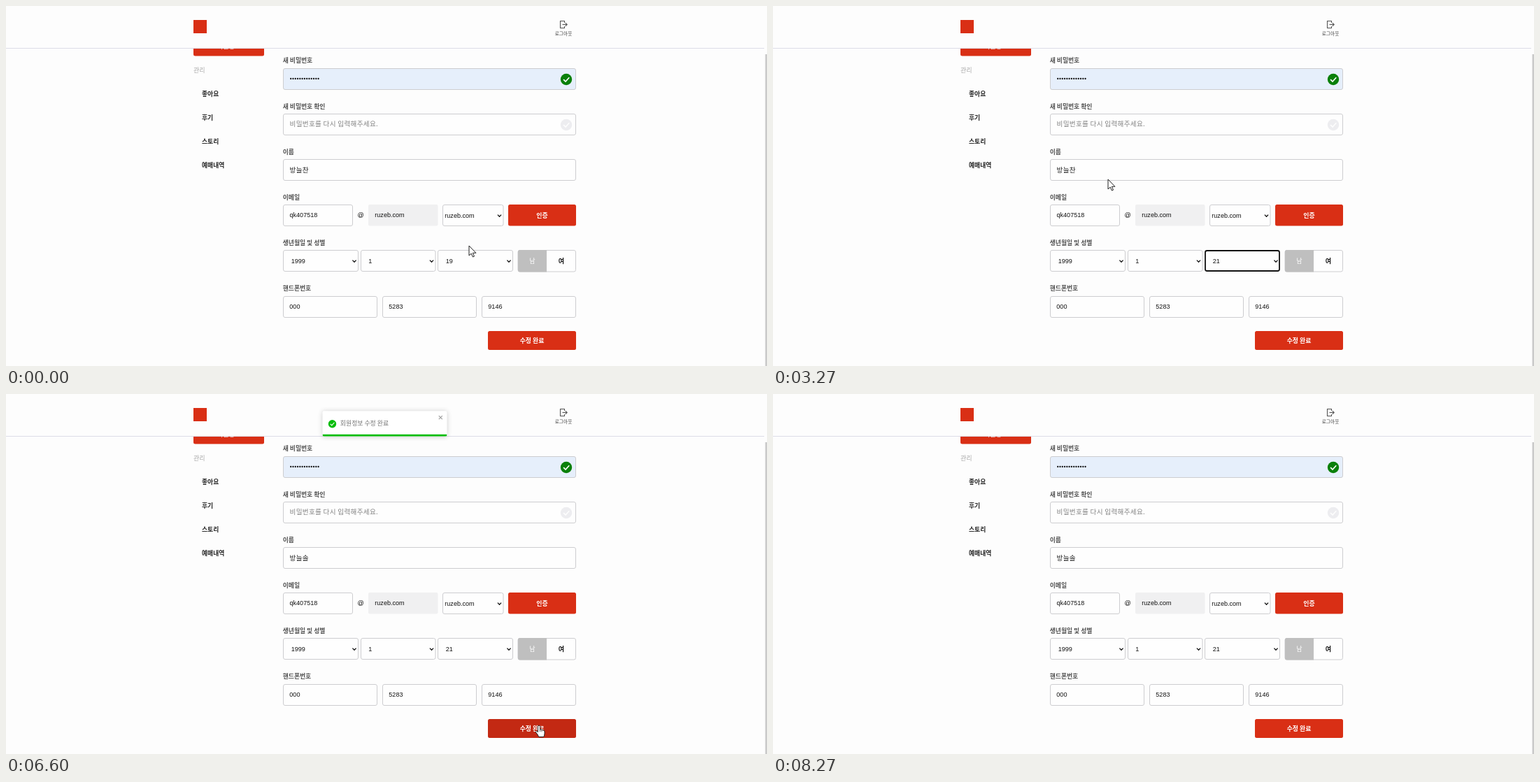
An HTML page with a canvas that plays this animation: 1088 by 515 pixels, repeating every 8.93 s.

```html
<!DOCTYPE html>
<html lang="ko">
<head>
<meta charset="utf-8">
<title>회원정보 수정</title>
<style>
  html, body { margin: 0; width: 100%; height: 100%; overflow: hidden; background: #fdfdfd; }
  canvas { display: block; }
</style>
</head>
<body>
<canvas id="stage" width="1088" height="515"></canvas>
<script>
const ctx = document.getElementById('stage').getContext('2d');
const LOOP = 8930;
const KO = '"Noto Sans CJK KR", "Noto Sans KR", "Noto Sans CJK", sans-serif';
const LATIN = '"Liberation Sans", Arial, sans-serif';
const RED = '#d92f15', RED_HOVER = '#c32913', BORDER = '#cdcdd0', GREEN = '#07bc0c';

const smooth = u => u * u * (3 - 2 * u);
const outCubic = u => 1 - (1 - u) ** 3;

// Interpolates rows of [time, ...values].
function track(keys, t, ease) {
  if (t <= keys[0][0]) return keys[0].slice(1);
  for (let i = 1; i < keys.length; i++) {
    const a = keys[i - 1], b = keys[i];
    if (t < b[0]) {
      const u = ease((t - a[0]) / (b[0] - a[0]));
      return a.slice(1).map((v, j) => v + (b[j + 1] - v) * u);
    }
  }
  return keys[keys.length - 1].slice(1);
}

// Last value of [time, value] already reached.
const step = (keys, t) => keys.reduce((v, k) => (t >= k[0] ? k[1] : v), null);

const pointer = [
  [30, 662, 343], [170, 632, 366], [300, 632, 366], [330, 630, 365],
  [630, 630, 365], [900, 641, 346], [1300, 651, 341],
  [1670, 651, 341], [1730, 652, 347], [1950, 652, 347], [2090, 630, 371],
  [2400, 718, 424], [2620, 718, 424], [2670, 717, 423],
  [2870, 717, 423], [3270, 479, 248], [3400, 479, 236], [3630, 490, 230],
  [5440, 490, 230], [5850, 768, 478], [6000, 762, 474],
  [7350, 762, 474], [7760, 846, -20]
];

const nameText = [
  [0, '방늘찬'], [3930, '방늘'], [4000, '방'], [4500, '방ㄴ'], [4630, '방느'],
  [4800, '방늘'], [4970, '방늘ㅅ'], [5030, '방늘소'], [5070, '방늘솔']
];

const toastIn = [[6190, -1700], [6610, 14.2], [6715, -5.7], [6820, 2.8], [6890, 0]];
const toastOut = [[7920, 0], [8060, -5.7], [8200, 11.3], [8235, 11.3], [8620, -1134]];

function text(s, x, cy, o = {}) {
  const { size = 9.07, color = '#111', weight = 400, align = 'left', font = KO, gap = 0 } = o;
  ctx.font = `${weight} ${size}px ${font}`;
  ctx.fillStyle = color;
  ctx.textAlign = align;
  ctx.letterSpacing = gap + 'px';
  ctx.fillText(s, x, cy + 3.3);
}

function box(x, y, w, h, fill, stroke, r = 2.5, line = 1) {
  ctx.beginPath();
  ctx.roundRect(x, y, w, h, r);
  if (fill) { ctx.fillStyle = fill; ctx.fill(); }
  if (stroke) { ctx.strokeStyle = stroke; ctx.lineWidth = line; ctx.stroke(); }
}

function line(points, color, width) {
  ctx.beginPath();
  points.forEach(([x, y], i) => (i ? ctx.lineTo(x, y) : ctx.moveTo(x, y)));
  ctx.strokeStyle = color;
  ctx.lineWidth = width;
  ctx.stroke();
}

function field(x, y, w, focus, fill = '#fefefe') {
  if (focus) box(x + 1, y + 1, w - 2, 29, fill, '#111', 2.5, 1.8);
  else box(x + .5, y + .5, w - 1, 30, fill, BORDER);
}

const plain = (s, x, cy) => text(s, x, cy, { font: LATIN });

function select(x, y, w, s, pad, focus) {
  field(x, y, w, focus);
  plain(s, x + pad, y + 15.5);
  const cx = x + w - 6, cy = y + 16;
  line([[cx - 2.6, cy - 1.4], [cx, cy + 1.3], [cx + 2.6, cy - 1.4]], '#111', 1.3);
}

function button(x, y, w, h, s, fill) {
  box(x, y, w, h, fill);
  text(s, x + w / 2, y + h / 2, { color: '#fff', weight: 600, align: 'center', size: 8.9 });
}

function check(x, y, r, fill, mark = '#fff') {
  ctx.beginPath();
  ctx.arc(x, y, r, 0, 7);
  ctx.fillStyle = fill;
  ctx.fill();
  line([[x - r * .48, y + r * .02], [x - r * .12, y + r * .38], [x + r * .52, y - r * .34]], mark, r * .19);
}

function drawHeader() {
  ctx.fillStyle = '#dcdce8';
  ctx.fillRect(0, 60, 1084, 1);
  ctx.fillStyle = '#c9c9c9';
  ctx.fillRect(1085.5, 69, 2.5, 446);
  ctx.fillStyle = RED;
  ctx.fillRect(268, 20, 19, 19);
  line([[798.5, 24], [798.5, 21.5], [792.5, 21.5], [792.5, 31.5], [798.5, 31.5], [798.5, 29]], '#555', 1.1);
  line([[795.5, 26.5], [802, 26.5]], '#555', 1.1);
  line([[799.8, 24.2], [802.2, 26.5], [799.8, 28.8]], '#555', 1.1);
  text('로그아웃', 797, 38.5, { size: 6.7, color: '#444', weight: 500, align: 'center' });
}

function drawSidebar() {
  ctx.save();
  ctx.beginPath();
  ctx.rect(268, 61, 102, 12);
  ctx.clip();
  box(268, 45, 101, 26.5, RED);
  text('회원정보', 318.5, 58, { color: '#fff', align: 'center' });
  ctx.restore();
  text('관리', 268, 91.5, { color: '#aaa' });
  ['좋아요', '후기', '스토리', '예매내역'].forEach((s, i) =>
    text(s, 280, 125.5 + i * 34.2, { weight: 600, size: 8.8, color: '#222' }));
}

function drawName(t, focus) {
  field(396, 219, 419, focus);
  const s = step(nameText, t);
  const style = { size: 9.6, gap: .3, color: '#222' };
  text(s, 405.5, 234.5, style);
  if (!focus) return;
  const end = 405.5 + ctx.measureText(s).width;
  ctx.fillStyle = '#111';
  if (t >= 4500 && t < 5250) ctx.fillRect(end - 9, 239.6, 8.6, .8);
  ctx.fillRect(end, 229, .9, 11.5);
}

function drawForm(t, hover) {
  ['새 비밀번호', '새 비밀번호 확인', '이름', '이메일', '생년월일 및 성별', '핸드폰번호'].forEach((s, i) =>
    text(s, 395.7, 78 + i * 65.2, { size: 8.8, weight: 600, color: '#505050' }));

  field(396, 89, 419, false, '#e6effb');
  ctx.fillStyle = '#111';
  for (let i = 0; i < 13; i++) {
    ctx.beginPath();
    ctx.arc(407.2 + i * 3.28, 104, 1.15, 0, 7);
    ctx.fill();
  }
  check(801, 105, 8.2, '#0a800a');

  field(396, 154, 419);
  text('비밀번호를 다시 입력해주세요.', 405.5, 168.5, { size: 9.6, gap: .3, color: '#808080' });
  check(801, 170, 8.2, '#ededf0', '#fdfdfd');

  drawName(t, t >= 3600 && t < 5970);

  field(396, 284, 100);
  plain('qk407518', 405.5, 298.5);
  text('@', 507, 299, { font: LATIN, align: 'center' });
  box(518, 284, 99.5, 30.5, '#f0f0f1', null, 2);
  plain('ruzeb.com', 527.3, 298.5);
  select(624, 284, 87.5, 'ruzeb.com', 3.3);
  button(718, 284, 97, 30.5, '인증', RED);

  select(396, 349, 108, '1999', 11.7);
  select(507, 349, 107.5, '1', 11.3);
  select(617, 349, 108, t < 1670 ? '19' : '21', 11.8, t >= 630 && t < 3600);
  box(732, 349.5, 82.5, 30.5, '#fefefe', BORDER);
  box(732, 349, 41, 31.5, '#bfbfbf', null, [2.5, 0, 0, 2.5]);
  text('남', 752.5, 364.5, { color: '#fff', align: 'center', weight: 500 });
  text('여', 794, 364.5, { align: 'center', weight: 600 });

  ['000', '5283', '9146'].forEach((s, i) => {
    field(396 + i * 142, 415, 135);
    plain(s, 405.3 + i * 142, 430);
  });
  button(689, 465, 126, 27, '수정 완료', hover ? RED_HOVER : RED);
}

function drawDayList(t, y) {
  const top = 120, row = 11.45, x = 617.5, w = 107.5;
  const scroll = smooth(Math.min(1, Math.max(0, (t - 1000) / 150)));
  const active = y < 349 ? Math.floor((y - top) / row + scroll) + 1 : 19;
  ctx.save();
  ctx.shadowColor = 'rgba(0,0,0,.26)';
  ctx.shadowBlur = 26;
  ctx.shadowOffsetY = 12;
  box(x, top, w, 229, '#fff', null, 0);
  ctx.restore();
  ctx.save();
  ctx.beginPath();
  ctx.rect(x, top, w, 229);
  ctx.clip();
  for (let d = 1; d <= 22; d++) {
    const ry = top + (d - 1 - scroll) * row;
    if (d === active) { ctx.fillStyle = '#1967d2'; ctx.fillRect(x, ry, w, row); }
    text(String(d), 629, ry + row / 2, { font: LATIN, color: d === active ? '#fff' : '#111' });
  }
  ctx.fillStyle = '#f1f1f1';
  ctx.fillRect(x + w - 9, top, 9, 229);
  ctx.fillStyle = '#c1c1c1';
  ctx.fillRect(x + w - 8, top + 9 + scroll * 7, 7, 136);
  ctx.restore();
  box(x, top, w, 229, null, '#777', 0, .7);
}

function drawToast(t) {
  if (t < 6190 || t > 8400) return;
  const [dy] = t < 7920 ? track(toastIn, t, outCubic) : track(toastOut, t, smooth);
  if (dy < -56 || t > 8260) return;
  ctx.save();
  ctx.translate(452.5, 10 + dy);
  ctx.save();
  ctx.shadowColor = 'rgba(0,0,0,.2)';
  ctx.shadowBlur = 7;
  ctx.shadowOffsetY = .6;
  box(0, 0, 178, 36.5, '#fff', null, 2.3);
  ctx.restore();
  check(14, 18.5, 5.7, GREEN);
  text('회원정보 수정 완료', 25.3, 18, { size: 8.9, color: '#757575' });
  line([[166.3, 7], [171.3, 12]], '#999', 1.1);
  line([[171.3, 7], [166.3, 12]], '#999', 1.1);
  const left = 1 - Math.min(1, Math.max(0, (t - 6900) / 1000));
  ctx.beginPath();
  ctx.roundRect(0, 0, 178, 36.5, 2.3);
  ctx.clip();
  ctx.fillStyle = GREEN;
  ctx.fillRect(0, 33.6, 178 * left, 2.9);
  ctx.restore();
}

const ARROW = new Path2D('M0 0V14L3.2 11.1 5.4 16 7.5 15.1 5.3 10.3H9.9Z');
const HAND = new Path2D('M-1.5 1.2Q0-1.4 1.5 1.2V6Q3.2 4.9 4 6.6Q5.6 5.8 6.2 7.4Q8 7 8 9V12' +
  'Q7.8 14 6.8 16.5H-.3Q-1.6 13-4.6 9.8Q-4.4 7.2-1.5 9.6Z');

function drawPointer(x, y, kind) {
  ctx.save();
  ctx.translate(x, y);
  if (kind === 'text') {
    line([[0, -6.5], [0, 6.5]], '#111', 1.5);
    line([[-4, -6.7], [4, -6.7]], '#111', 1.2);
    line([[-4, 6.7], [4, 6.7]], '#111', 1.2);
  } else {
    const shape = kind === 'hand' ? HAND : ARROW;
    ctx.fillStyle = '#fff';
    ctx.strokeStyle = '#222';
    ctx.lineWidth = 1;
    ctx.lineJoin = 'round';
    ctx.fill(shape);
    ctx.stroke(shape);
    if (kind === 'hand') {
      line([[1.5, 6], [1.5, 9]], '#222', .8);
      line([[4, 6.8], [4, 9.4]], '#222', .8);
    }
  }
  ctx.restore();
}

function draw(t) {
  const [x, y] = track(pointer, t, smooth);
  const hover = x > 689 && x < 815 && y > 465;
  const inName = x > 396 && x < 815 && y > 219 && y < 247 && t < 7000;
  ctx.fillStyle = '#fdfdfd';
  ctx.fillRect(0, 0, 1088, 515);
  drawHeader();
  drawSidebar();
  drawForm(t, hover);
  if (t >= 630 && t < 1670) drawDayList(t, y);
  drawToast(t);
  drawPointer(x, y, hover ? 'hand' : inName ? 'text' : 'arrow');
}

function frame() {
  draw(performance.now() % LOOP);
  requestAnimationFrame(frame);
}
frame();
</script>
</body>
</html>
```
